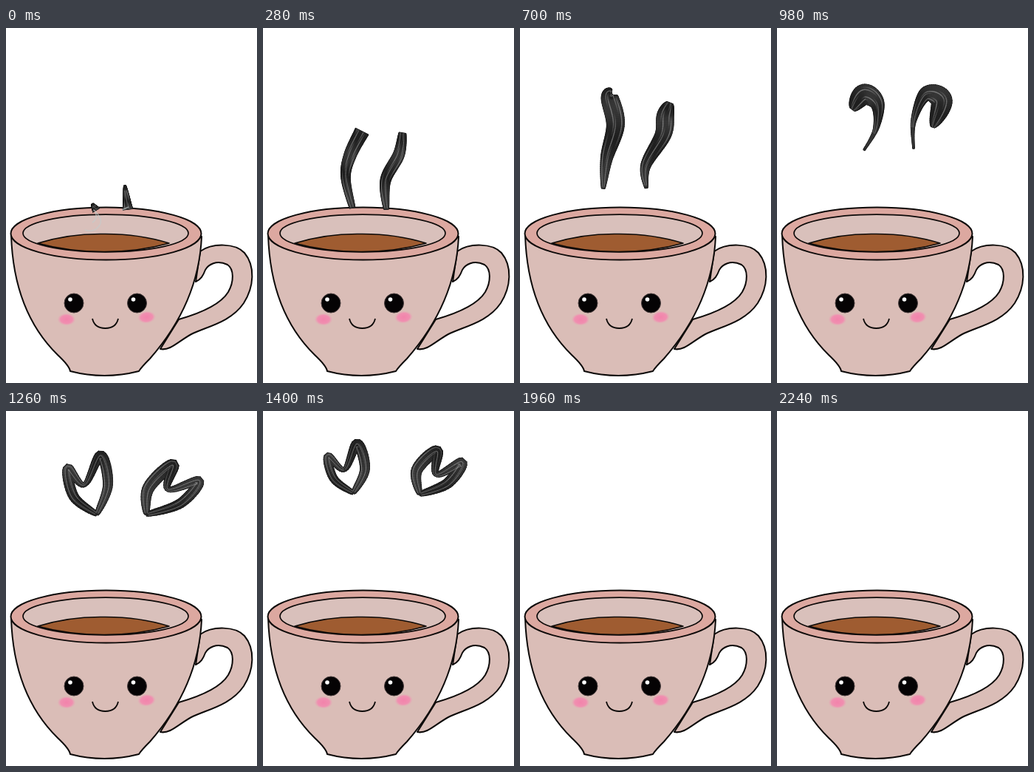
Write an HTML page with a canvas that moves like this. It is 340 px wide and 480 px high and loops after 2380 ms.

```html
<!DOCTYPE html>
<html lang="en">
<head>
<meta charset="utf-8">
<title>Steaming cup</title>
<style>
  html, body { margin: 0; width: 100%; height: 100%; overflow: hidden; background: #fff; }
  svg, canvas { position: absolute; left: 0; top: 0; width: 340px; height: 480px; }
</style>
</head>
<body>
<svg viewBox="0 0 340 480">
  <defs>
    <radialGradient id="blush">
      <stop offset="0" stop-color="#f283ab"/>
      <stop offset=".65" stop-color="#f08fb0"/>
      <stop offset="1" stop-color="#e9a6b5" stop-opacity="0"/>
    </radialGradient>
    <g id="eye">
      <circle r="13" fill="#050304" stroke="#453b3b" stroke-width="1"/>
      <circle cx="-5" cy="-5" r="2.8" fill="#fff"/>
    </g>
  </defs>
  <g fill="#dabdb7" stroke="#0c0908" stroke-width="2" stroke-linejoin="round">
    <path d="M263 302C280 290 311 291 323 304C338 322 336 350 322 372C305 397 275 403 253 413C235 422 223 437 209 434L234 394C262 386 290 375 301 357C309 343 309 326 300 320C285 313 274 320 270 327C267 335 264 340 257 343Z"/>
    <path d="M7 280C9 345 27 400 70 442Q86 457 87 464Q133 476 180 464Q183 459 195 447C232 405 262 350 265 282Z"/>
    <ellipse cx="135.5" cy="278" rx="129" ry="35.5" fill="#dca8a0"/>
    <ellipse cx="135" cy="277.5" rx="112" ry="25.3" fill="#d9c0bb" stroke-width="1.7"/>
    <path d="M43 291Q85 278 131 278.5Q180 278 221 291Q180 302.5 133 302.5Q85 302.5 43 291Z" fill="#9f5c31" stroke-width="1.7"/>
    <path d="M117 393Q120 406 134.5 406Q149 406 152 393" fill="none" stroke-width="1.8"/>
  </g>
  <use href="#eye" x="92" y="372"/>
  <use href="#eye" x="177.5" y="372"/>
  <ellipse cx="82" cy="394" rx="12.5" ry="8.5" fill="url(#blush)"/>
  <ellipse cx="190.5" cy="391" rx="12.5" ry="8.5" fill="url(#blush)" transform="rotate(-6 190.5 391)"/>
</svg>
<canvas id="steam" width="340" height="480"></canvas>
<script>
const STEP = 140, STEPS = 17, LAST = 13, SAMPLES = 72;
const ctx = document.getElementById('steam').getContext('2d');

function spline(a, b, c, d, u) {
  return b + u / 2 * (c - a + u * (2 * a - 5 * b + 4 * c - d + u * (3 * (b - c) + d - a)));
}

// Samples [x, y, width] along a smooth line through x, y pairs.
function trace(line, width) {
  const n = line.length / 2;
  const at = (i, k) => line[Math.max(0, Math.min(n - 1, i)) * 2 + k];
  return Array.from({ length: SAMPLES }, (_, s) => {
    const u = s / (SAMPLES - 1), p = u * (n - 1), i = Math.min(n - 2, Math.floor(p));
    const [x, y] = [0, 1].map(k => spline(at(i - 1, k), at(i, k), at(i + 1, k), at(i + 2, k), p - i));
    return [x, y, width(u)];
  });
}

// A wisp swells between tail and head; skew moves the swelling headwards.
function plume(line, tail, mid, head, skew = 1) {
  return trace(line, u => tail + (head - tail) * u
    + (mid - (tail + head) / 2) * Math.sin(Math.PI * u ** skew));
}

// A closed stroke from the tip round both lobes, thin at tip and notch.
function heart(line, tip, lobe1, lobe2) {
  return trace([...line, line[0], line[1]], u =>
    tip + ((u < .5 ? lobe1 : lobe2) - tip) * Math.abs(Math.sin(2 * Math.PI * u)) ** .7);
}

const keySteps = [0, 2, 4, 7, 9, 12];
const left = [
  plume([122,246, 117,238], 10, 6, 2),
  plume([121,243, 112,202, 118,172, 134,140], 7, 14, 19),
  plume([110,243, 109,196, 126,145, 123,95, 135,78], 5, 26, 4),
  plume([118,165, 134,136, 136,103, 118,90, 102,110], 2, 26, 7, 2.2),
  heart([123,140, 138,100, 128,60, 106,100, 84,78, 92,116], 4, 13, 13),
  heart([121,53, 138,36, 126,13, 119,38, 97,29, 104,43], 4, 13, 6)
];
const right = [
  plume([165,245, 161,213], 13, 8, 2),
  plume([167,245, 166,206, 184,171, 189,142], 6, 15, 9),
  plume([164,243, 163,216, 190,172, 184,128, 199,85], 4, 22, 10),
  plume([185,163, 185,126, 201,90, 223,98, 211,134], 2, 27, 5, 2.2),
  heart([190,140, 193,104, 226,73, 219,106, 261,95, 236,125], 4, 16, 13),
  heart([256,58, 239,32, 255,17, 266,46, 285,20, 277,44], 4, 13, 16)
];

function poseAt(poses, step) {
  if (step === LAST) return poses[5].map(([x, y, w]) => [x + 2, y - 30, w]);
  let k = 0;
  while (k < keySteps.length - 2 && step >= keySteps[k + 1]) k++;
  const u = (step - keySteps[k]) / (keySteps[k + 1] - keySteps[k]);
  return poses[k].map((p, i) => p.map((v, j) => v + (poses[k + 1][i][j] - v) * u));
}

function drawWisp(points) {
  const rib = points.map(([x, y, w], i) => {
    const a = points[Math.max(0, i - 1)], b = points[Math.min(SAMPLES - 1, i + 1)];
    const dx = b[0] - a[0], dy = b[1] - a[1], len = Math.hypot(dx, dy) || 1;
    const half = Math.max(w, 1) / 2;
    return side => [x - dy / len * half * side, y + dx / len * half * side];
  });
  const slice = i => {
    const path = new Path2D();
    path.moveTo(...rib[i - 1](-1));
    path.lineTo(...rib[i](-1));
    path.lineTo(...rib[i](1));
    path.lineTo(...rib[i - 1](1));
    path.closePath();
    return path;
  };

  ctx.lineJoin = 'round';
  ctx.strokeStyle = '#0b0b0b';
  ctx.lineWidth = 1.6;
  for (let i = 1; i < SAMPLES; i++) ctx.stroke(slice(i));
  ctx.lineWidth = 0.6;
  for (let i = 1; i < SAMPLES; i++) {
    const shade = Math.round(44 + 12 * Math.sin(i * 0.17));
    ctx.fillStyle = ctx.strokeStyle = `rgb(${shade},${shade},${shade})`;
    ctx.fill(slice(i));
    ctx.stroke(slice(i));
  }

  // Pale strands that fade in and out along the wisp
  for (let n = 0; n < 7; n++) {
    const side = -0.72 + n * 0.24;
    for (let i = 2; i < SAMPLES; i++) {
      const glow = Math.sin(i * 0.1 + n * 1.7);
      if (glow <= 0 || points[i][2] < 5) continue;
      ctx.strokeStyle = `rgba(215,215,215,${(0.42 * glow).toFixed(3)})`;
      ctx.lineWidth = 0.6 + points[i][2] * 0.035;
      ctx.beginPath();
      ctx.moveTo(...rib[i - 1](side));
      ctx.lineTo(...rib[i](side));
      ctx.stroke();
    }
  }
}

function drawSwirl() {
  ctx.strokeStyle = 'rgba(196,204,204,.65)';
  ctx.lineWidth = 1.5;
  ctx.stroke(new Path2D('M119 246Q134 260 125 269Q118 277 107 273M121 249Q125 258 117 263M157 246L166 242'));
}

let shown = -1;
function tick() {
  const step = Math.floor(performance.now() / STEP) % STEPS;
  if (step !== shown) {
    shown = step;
    ctx.clearRect(0, 0, 340, 480);
    if (step <= LAST) [left, right].forEach(poses => drawWisp(poseAt(poses, step)));
    if (step === 0) drawSwirl();
  }
  requestAnimationFrame(tick);
}
tick();
</script>
</body>
</html>
```
